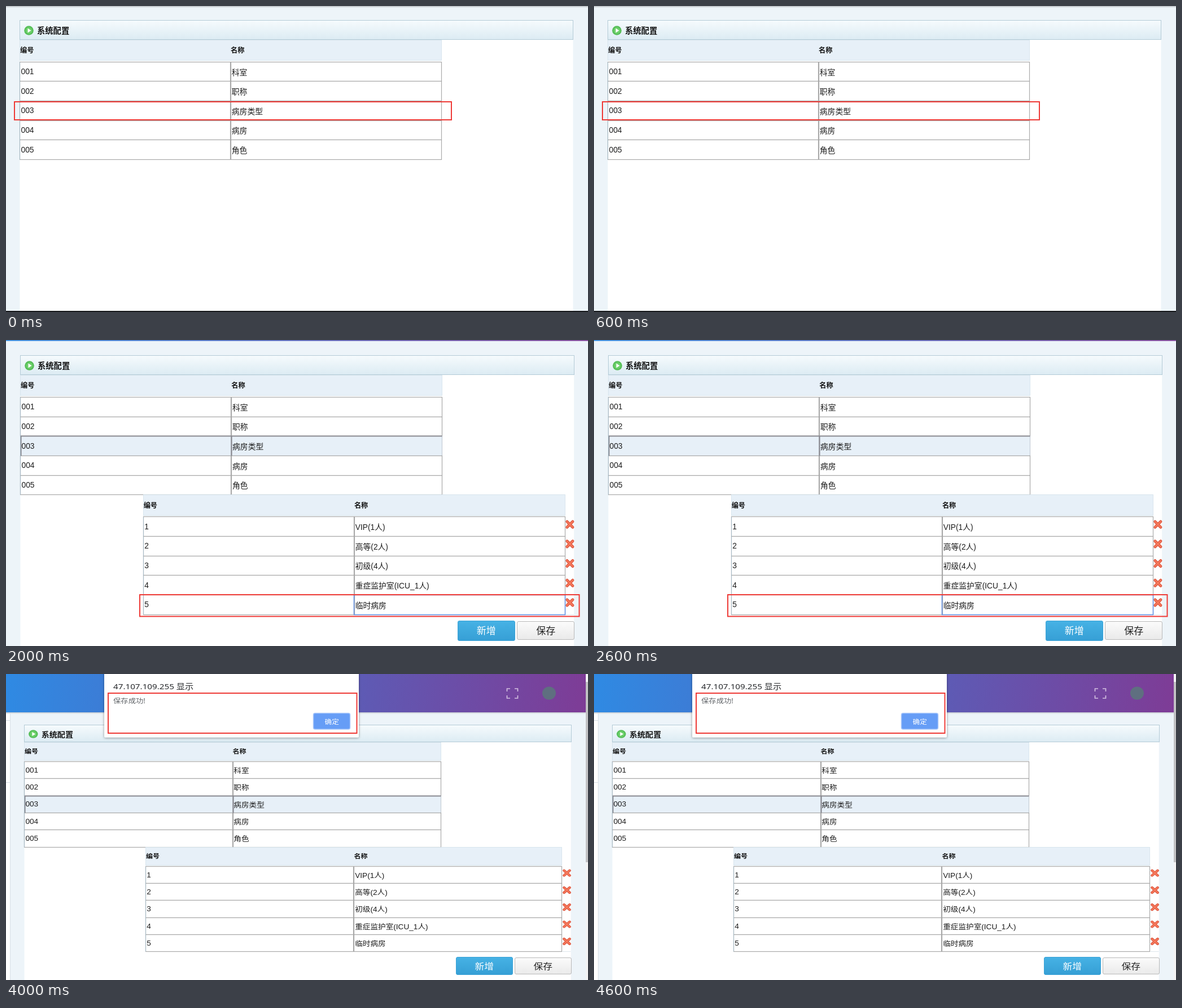
These frames come from a looping animation (1031x543 px, 5 s). An HTML page:

```html
<!DOCTYPE html>
<html lang="zh-CN">
<head>
<meta charset="utf-8">
<title>系统配置</title>
<style>
html, body { margin: 0; width: 100%; height: 100%; overflow: hidden; background: #edf4f9; }
svg { display: block; width: 1031px; height: 543px; }
text { font-family: "Liberation Sans", "Noto Sans CJK SC", "Noto Sans CJK", sans-serif; white-space: pre; }
.dialog { font-family: "Noto Sans", "Noto Sans CJK SC", "Noto Sans CJK", sans-serif; }
</style>
</head>
<body>
<svg id="stage" viewBox="0 0 1031 543">
  <defs>
    <linearGradient id="title" x2="0" y2="1"><stop stop-color="#f6fbfd"/><stop offset="1" stop-color="#dcebf3"/></linearGradient>
    <linearGradient id="blue" x2="0" y2="1"><stop stop-color="#46b2e5"/><stop offset="1" stop-color="#369fd5"/></linearGradient>
    <linearGradient id="grey" x2="0" y2="1"><stop stop-color="#fbfbfb"/><stop offset="1" stop-color="#eaeaea"/></linearGradient>
    <linearGradient id="banner" gradientUnits="userSpaceOnUse" x1="0" y1="0" x2="1026" y2="68">
      <stop stop-color="#2f8ae3"/><stop offset=".5" stop-color="#5563bd"/><stop offset="1" stop-color="#7e3c96"/>
    </linearGradient>
    <linearGradient id="shade" x2="0" y2="1"><stop stop-color="#b4b8bc"/><stop offset="1" stop-color="#edf4f9"/></linearGradient>
    <filter id="shadow" x="-5%" y="-10%" width="110%" height="130%"><feDropShadow dx="0" dy="1" stdDeviation="2" flood-opacity=".4"/></filter>
  </defs>
</svg>
<script>
const stage = document.getElementById('stage');
const STEP = 1000;
const ROW = 34.6;
const LINE = '#a9a9a9';
const RED = '#ee3a36';
const FOCUS = '#5b8ee6';
const MAIN_ROWS = ['科室', '职称', '病房类型', '病房', '角色'].map((name, i) => ['00' + (i + 1), name]);
const SUB_ROWS = ['VIP(1人)', '高等(2人)', '初级(4人)', '重症监护室(ICU_1人)', '临时病房'].map((name, i) => [String(i + 1), name]);

function add(parent, tag, attrs = {}, content) {
  const node = document.createElementNS('http://www.w3.org/2000/svg', tag);
  for (const key in attrs) node.setAttribute(key, attrs[key]);
  if (content) node.textContent = content;
  parent.append(node);
  return node;
}

const snap = v => Math.floor(v) + 0.5;

// Draws in page units, mapped to the stage by one offset and scale per view.
function painter(g, { ox, oy, sx, sy }) {
  const X = x => ox + x * sx;
  const Y = y => oy + y * sy;
  const place = (x, y) => `translate(${X(x)} ${Y(y)}) scale(${sx} ${sy})`;
  return {
    X, Y, place,
    box(x1, y1, x2, y2, attrs) {
      const x = snap(X(x1)), y = snap(Y(y1));
      add(g, 'rect', { x, y, width: snap(X(x2)) - x, height: snap(Y(y2)) - y, fill: 'none', ...attrs });
    },
    line(x1, y1, x2, y2, stroke, width = 1) {
      add(g, 'path', { d: `M${snap(X(x1))} ${snap(Y(y1))}L${snap(X(x2))} ${snap(Y(y2))}`, stroke, 'stroke-width': width });
    },
    text(x, y, size, content, attrs = {}) {
      add(g, 'text', { transform: place(x, y), 'font-size': size, fill: '#1c1c1c', ...attrs }, content);
    }
  };
}

function rect(g, x, y, width, height, fill, attrs = {}) {
  add(g, 'rect', { x, y, width, height, fill, ...attrs });
}

function outline(g, x1, y1, x2, y2) {
  rect(g, x1, y1, x2 - x1, y2 - y1, 'none', { stroke: RED, 'stroke-width': 2 });
}

function table(p, x, top, rows, selected = -1) {
  const mid = x + 373, right = x + 746.5;
  p.box(x, top - 38.6, right, top - 2.4, { fill: '#e7f0f8', stroke: '#d3e1ea', 'stroke-width': 0.8 });
  ['编号', '名称'].forEach((label, i) =>
    p.text(x + 0.5 + i * 373, top - 16, 12.2, label, { 'font-weight': 700, fill: '#111' }));
  rows.forEach(([id, name], i) => {
    const y = top + i * ROW, end = y + ROW;
    const fill = i === selected ? '#e7f0f8' : '#fff';
    const style = { fill, stroke: i === selected ? '#c5ced6' : LINE, 'stroke-width': 1.2 };
    p.box(x, y, mid, end, style);
    p.box(mid + 1, y, right, end, style);
    p.text(x + 2, y + 22, 13.8, id);
    p.text(mid + 2.3, y + 23.4, 13.8, name);
  });
  if (selected >= 0) {
    const y = top + selected * ROW, end = y + ROW;
    p.line(x, end, right, end, LINE, 1.2);
    p.line(x, y, right, y, '#8c8b92', 2);
    p.line(x + 1, y, x + 1, end, '#85858c', 2);
    p.line(mid + 1, y, mid + 1, end, '#85858c', 2);
  } 
  p.line(x, top, x, top + rows.length * ROW, '#a5b8c4');
}

function cross(g, p, x, y) {
  const icon = add(g, 'g', { transform: p.place(x, y), 'stroke-linecap': 'round' });
  const d = 'M-5 -5L5 5M5 -5L-5 5';
  add(icon, 'path', { d, stroke: '#d9503a', 'stroke-width': 5 });
  add(icon, 'path', { d, stroke: '#f4775a', 'stroke-width': 3 });
}

function button(p, x, y, w, h, label, style, color) {
  p.box(x, y, x + w, y + h, { rx: 2.5, ...style });
  p.text(x + w / 2, y + h / 2 + 6.5, 17, label, { fill: color, 'text-anchor': 'middle' });
}

function page(g, view) {
  const p = painter(g, view);
  rect(g, p.X(0), p.Y(34), 980 * view.sx, 543 - p.Y(34), '#fff');
  p.box(0, 0, 980.4, 34.4, { fill: 'url(#title)', stroke: '#b4cbd7' });
  const icon = add(g, 'g', { transform: p.place(16, 18) });
  add(icon, 'circle', { r: 8.3, fill: '#55bd57' });
  add(icon, 'circle', { r: 6, fill: '#6bcf69' });
  add(icon, 'path', { d: 'M-2 -4L4 0L-2 4Z', fill: '#fff' });
  p.text(30.5, 23.7, 14.3, '系统配置', { 'font-weight': 700, fill: '#111' });

  const count = view.items;
  table(p, 0, 73.7, MAIN_ROWS, count ? 2 : -1);
  if (!count) return p;
  const top = 285.6, end = top + count * ROW;
  table(p, 217.5, top, SUB_ROWS.slice(0, count));
  for (let i = 0; i < count; i++) cross(g, p, 972.7, top + 13.5 + i * ROW);
  p.line(964.5, end, 980, end, '#dde6ec');
  button(p, 774, end + 11, 101.5, 35, '新增', { fill: 'url(#blue)', stroke: '#3aa2d6' }, '#fff');
  button(p, 879.5, end + 12.2, 101, 32.5, '保存', { fill: 'url(#grey)', stroke: '#b9b9b9' }, '#222');
  return p;
}

function focusName(p) {
  p.box(591, 285.6 + 4 * ROW, 964, 285.6 + 5 * ROW, { stroke: FOCUS, 'stroke-width': 1.4 });
}

function scrollbar(g, top, bottom) {
  rect(g, 1027, 0, 4, 543, '#f3f3f4');
  rect(g, 1027, top, 4, bottom - top, '#c1c1c3');
}

const topStrip = (g, width = 1031) => rect(g, 0, 0, width, 1.7, 'url(#banner)');
const bottomEdge = g => rect(g, 0, 541, 1031, 2, '#15171a');

function listView(g) {
  rect(g, 0, 0, 1031, 3, 'url(#shade)');
  page(g, { ox: 24.5, oy: 25.5, sx: 1, sy: 1, items: 0 });
  bottomEdge(g);
  outline(g, 15, 170, 789, 202);
}

function detailView(g) {
  topStrip(g);
  const p = page(g, { ox: 25.5, oy: 27.5, sx: 1, sy: 0.996, items: 4 });
  const y = 73.7 + 2 * ROW;
  p.line(0, y + ROW, 373, y + ROW, '#9fb9e2');
  p.line(1, y, 1, y + ROW, FOCUS, 2);
  p.line(373.5, y, 373.5, y + ROW, FOCUS, 2);
  add(g, 'path', { d: 'M-1 519.5H174Q177 519.5 177 522.5V543H-1Z', fill: '#fff', stroke: '#d9dde0' });
  bottomEdge(g);
  outline(g, 790, 454, 907.5, 502.5);
}

function addedView(g) {
  topStrip(g);
  focusName(page(g, { ox: 25.5, oy: 27.5, sx: 1.0007, sy: 1.002, items: 5 }));
  outline(g, 237, 452, 1015.5, 490.5);
}

function saveView(g) {
  topStrip(g, 1027);
  const p = page(g, { ox: 25.5, oy: 26.8, sx: 0.9946, sy: 1.001, items: 5 });
  focusName(p);
  const y = 285.6 + 4 * ROW;
  p.line(646.5, y + 10, 646.5, y + 25, '#222');
  scrollbar(g, 0, 304);
  outline(g, 897.5, 492, 1012.5, 538);
}

function savedView(g) {
  rect(g, 0, 68, 7, 475, '#fff');
  add(g, 'path', { d: 'M7.5 68V543M0 82.5H7M0 192.5H7', stroke: '#d8e0e6' });
  const view = { ox: 32.5, oy: 90.8, sx: 0.988, sy: 0.877, items: 5 };
  page(g, view);
  rect(g, 0, 68, 1027, 3, 'url(#shade)', { opacity: 0.7 });
  rect(g, 0, 0, 1027, 68, 'url(#banner)');
  add(g, 'path', {
    d: 'M887.5 31V26H893M901 26H906.5V31M906.5 38V43H901M893 43H887.5V38',
    fill: 'none', stroke: '#d2bfe0', 'stroke-width': 1.7
  });
  add(g, 'ellipse', { cx: 962, cy: 34, rx: 12, ry: 11.5, fill: '#5f6f80' });
  scrollbar(g, 14, 334);

  rect(g, 174, -6, 451, 118.5, '#fff', { filter: 'url(#shadow)', rx: 2 });
  const d = painter(g, { ox: 0, oy: 0, sx: view.sx, sy: view.sy });
  const label = (x, y, size, content, fill) =>
    d.text(x / view.sx, y / view.sy, size, content, { fill, class: 'dialog' });
  label(190, 26.5, 15.4, '47.107.109.255 显示', '#26282b');
  label(190, 51.5, 13.5, '保存成功!', '#63666a');
  rect(g, 544.5, 69.5, 65, 28.5, '#669df6', { rx: 3, stroke: '#a9c7fa', 'stroke-width': 1.5 });
  label(564.5, 88.8, 12.8, '确定', '#fff');
  outline(g, 181, 34, 621.5, 105);
}

const views = [listView, detailView, addedView, saveView, savedView].map(draw => {
  const g = add(stage, 'g', { visibility: 'hidden' });
  rect(g, 0, 0, 1031, 543, '#edf4f9');
  draw(g);
  return g;
});

const start = performance.now();
function tick(now) {
  const current = Math.floor(Math.max(0, now - start) / STEP) % views.length;
  views.forEach((g, i) => g.setAttribute('visibility', i === current ? 'visible' : 'hidden'));
  requestAnimationFrame(tick);
}
tick(start);
</script>
</body>
</html>
```
